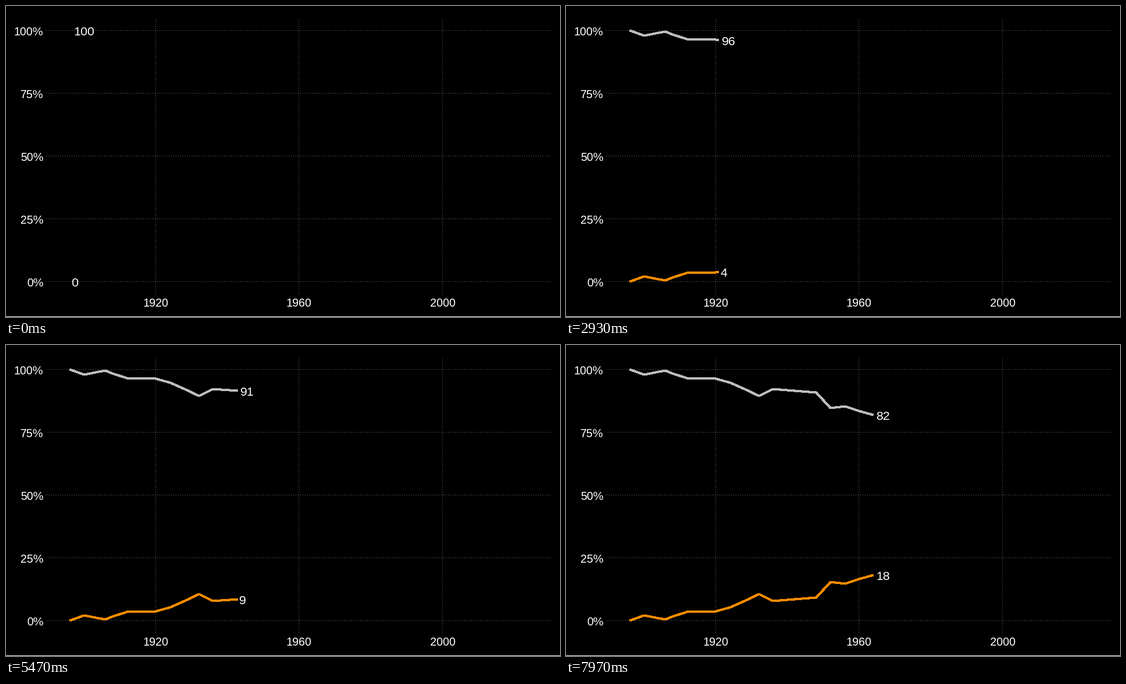
A matplotlib script that plays this animation: 960x540 px, repeating every 8000 ms.

```python
import matplotlib.pyplot as plt
import numpy as np
from matplotlib.animation import FuncAnimation

W, H, DPI = 960, 540, 100
FRAMES, LOOP_MS = 240, 8000
PX = 72 / DPI  # points per pixel
FIRST = 1896
PAUSES = {1916, 1940, 1944}

# Every fourth year, without the pauses, plus one extra event.
YEARS = np.array(sorted({1906} | set(range(FIRST, 1965, 4)) - PAUSES))
# Where the curve bends; the years between lie on straight lines.
BENDS = {1896: 0, 1900: 2, 1906: 0.4, 1908: 1.6, 1912: 3.4, 1920: 3.6,
         1924: 5.2, 1932: 10.6, 1936: 7.8, 1948: 9.2, 1952: 15.3,
         1956: 14.7, 1964: 18.1}
SHARE = np.interp(YEARS, list(BENDS), list(BENDS.values()))
# Each data year lands on a whole frame.
KEYS = np.round((YEARS - FIRST) * 421 / 120)


def px_x(year):
    return 259.5 + (year - 1920) * 6.21


def px_y(percent):
    return 478.5 - percent * 4.36


def pixel(v):
    """Centre of the pixel that holds v."""
    return np.floor(v) + 0.5


plt.rcParams.update({"font.family": "Liberation Sans",
                     "text.hinting": "native", "text.hinting_factor": 1})
fig = plt.figure(figsize=(W / DPI, H / DPI), dpi=DPI, facecolor="black")
ax = fig.add_axes([0, 0, 1, 1])
ax.set(xlim=(0, W), ylim=(H, 0))
ax.axis("off")


def write(x, y, s, size, ha):
    return ax.text(x, y, s, color="white", fontsize=size * PX, ha=ha,
                   va="baseline", zorder=4)


def grid_line(xs, ys):
    ax.plot(xs, ys, color="#7f7f7f", lw=PX, dashes=(1, 3),
            dash_capstyle="butt", antialiased=False, snap=False, zorder=1)


for p in range(0, 101, 25):
    grid_line((70, 944), (px_y(p), px_y(p)))
    write(65, px_y(p) + 8.3, f"{p}%", 20, "right")
for year in (1920, 1960, 2000):
    x = pixel(px_x(year))
    grid_line((x, x), (500, 22))
    write(x, 522, str(year), 20, "center")
ax.axhspan(H - 1, H, color="white", lw=0)  # bottom edge


def series(values, color):
    line, = ax.plot([], [], color=color, lw=3 * PX, antialiased=False,
                    solid_capstyle="butt", solid_joinstyle="round",
                    snap=False, zorder=3)
    return values, line, write(0, 0, "", 21, "left")


ALL = [series(100 - SHARE, "#bebebe"), series(SHARE, "#ff8c00")]


def draw(frame):
    year = np.interp(frame, KEYS, YEARS)
    past = KEYS < frame
    nearest = int(np.interp(frame, KEYS, np.arange(len(KEYS))) + 0.5)
    x = px_x(year)
    artists = []
    for values, line, label in ALL:
        y = px_y(np.interp(frame, KEYS, values))
        line.set_data(pixel(np.append(px_x(YEARS[past]), x)),
                      pixel(np.append(px_y(values[past]), y)))
        text = f"{values[nearest]:.0f}"
        # The gap before the label is a fifth of its width.
        label.set_text(text)
        label.set_position((x + 0.2 * 12 * len(text), y + 8.5))
        artists += [line, label]
    return artists


anim = FuncAnimation(fig, draw, frames=FRAMES, interval=LOOP_MS / FRAMES,
                     repeat=True, repeat_delay=0, blit=False)
plt.show()
```
